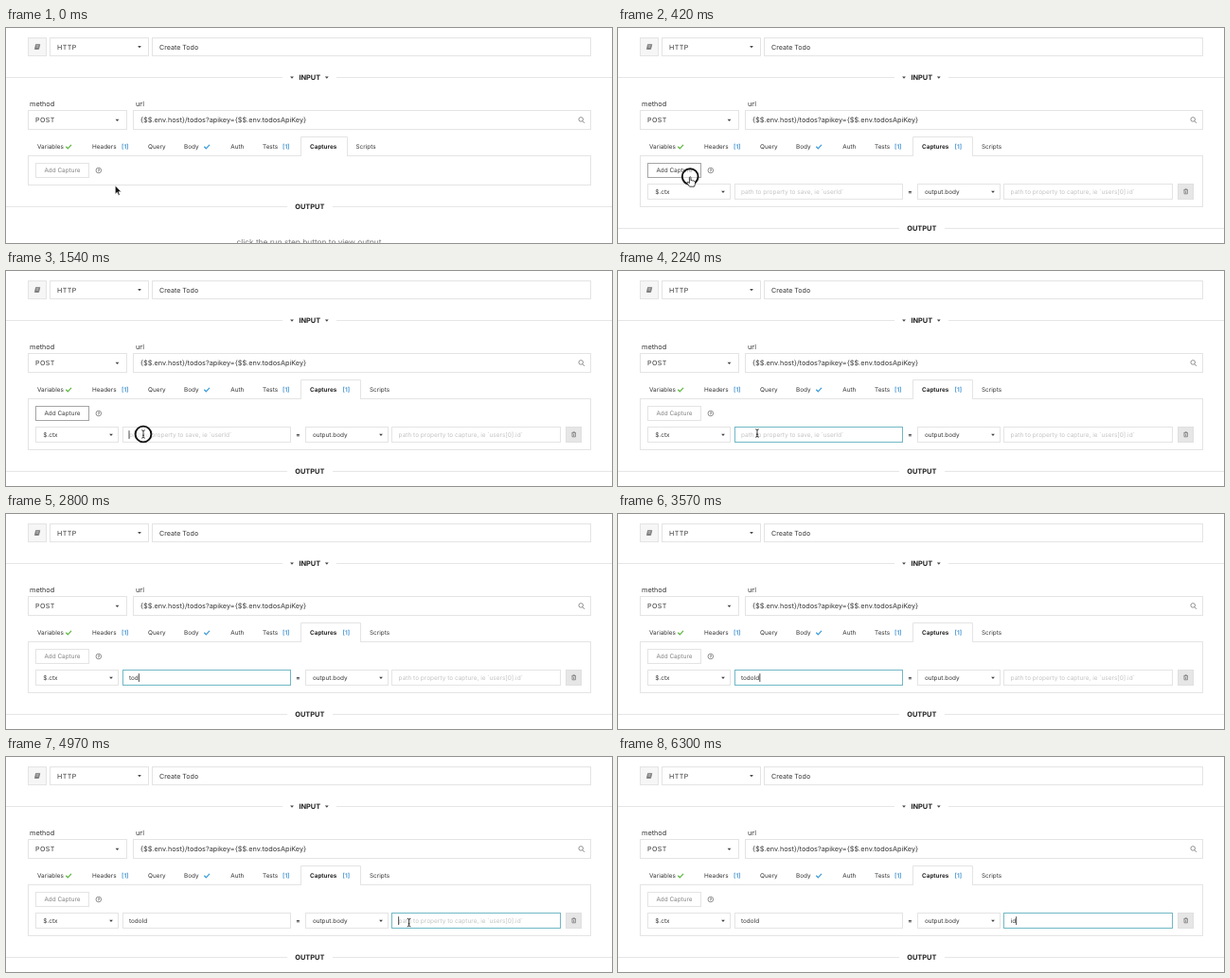
These frames come from a looping animation (640x228 px, 6370 ms). An HTML page:

```html
<!DOCTYPE html>
<html lang="en">
<head>
<meta charset="utf-8">
<title>Add a capture</title>
<style>
  html, body { margin: 0; width: 100%; height: 100%; overflow: hidden; background: #fff; }
  svg { display: block; width: 100vw; height: 100vh; }
  text { font: 6.4px Inter, Roboto, sans-serif; fill: #333; text-rendering: geometricPrecision; white-space: pre; }
  .big { font-size: 7.3px; }
  .caps { font-size: 7.1px; letter-spacing: .4px; }
  .head { font-size: 7.4px; font-weight: 700; fill: #222; text-anchor: middle; }
  .note { font-size: 8.3px; fill: #777; }
  .bold { font-weight: 600; fill: #111; }
  .blue { font-weight: 600; fill: #3a8fd0; }
  .hint { font-size: 6.5px; fill: #c4c4c4; }
  .box { fill: #fff; stroke: #e4e4e4; }
  .grey { fill: #f6f6f6; stroke: #e4e4e4; }
  .rule { fill: none; stroke: #e6e6e6; }
  .tri { fill: #444; }
  .tick { fill: none; stroke-width: 1.25; }
  .icon { fill: none; stroke: #777; }
  .pen { stroke: #111; stroke-width: .8; }
</style>
</head>
<body>
<svg viewBox="0 0 640 228">
  <defs>
    <path id="tri" class="tri" d="M-1.9-.9H1.9L0 1.2Z"/>
  </defs>

  <!-- step header -->
  <rect class="grey" x="23.5" y="10.5" width="19" height="19"/>
  <path d="M31.5 17.4H35.8L34.6 22.4H30.4Z" fill="#777" stroke="#777" stroke-width=".7" stroke-linejoin="round"/>
  <path d="M32 18.8H34.6M31.7 20.2H34.3" stroke="#eee" stroke-width=".6"/>
  <rect class="box" x="46.5" y="10.5" width="104" height="19"/>
  <text class="caps" x="54" y="22.6">HTTP</text>
  <use href="#tri" x="141" y="20"/>
  <rect class="box" x="154.5" y="10.5" width="463" height="19"/>
  <text x="162" y="22.6" style="font-size:7.1px">Create Todo</text>

  <path class="rule" d="M0 52.5H292M349 52.5H640"/>
  <use href="#tri" x="302" y="52.5"/>
  <text class="head" x="320.8" y="55.4">INPUT</text>
  <use href="#tri" x="338.8" y="52.5"/>

  <!-- request -->
  <text class="big" x="25" y="83.2">method</text>
  <text class="big" x="137" y="83.2">url</text>
  <rect class="box" x="23.5" y="87.5" width="104" height="20"/>
  <text class="caps" x="31" y="100.2">POST</text>
  <use href="#tri" x="117.5" y="97.7"/>
  <rect class="box" x="134.5" y="87.5" width="483" height="20"/>
  <text class="big" x="142" y="100">{$$.env.host}/todos?apikey={$$.env.todosApiKey}</text>
  <circle class="icon" cx="607.2" cy="96.9" r="2.3" stroke-width=".8"/>
  <path class="icon" d="M608.9 98.6L611 100.8" stroke-width=".9"/>

  <!-- tabs -->
  <rect id="panel" class="box" x="23.5" y="135.5" width="594"/>
  <path id="tab" class="box"/>
  <text x="33" y="128.3">Variables</text>
  <path class="tick" stroke="#5cb83c" d="M63.3 125.8L65.3 127.8L69 123.8"/>
  <text x="91" y="128.3">Headers</text>
  <text class="blue" x="122" y="128.3">[1]</text>
  <text x="150" y="128.3">Query</text>
  <text x="188" y="128.3">Body</text>
  <path class="tick" stroke="#3a9bdc" d="M209.3 125.8L211.3 127.8L215 123.8"/>
  <text x="237.3" y="128.3">Auth</text>
  <text x="271" y="128.3">Tests</text>
  <text class="blue" x="292" y="128.3">[1]</text>
  <text class="bold" x="321" y="128.3">Captures</text>
  <text id="count" class="blue" x="355.6" y="128.3">[1]</text>
  <text id="scripts" y="128.3">Scripts</text>

  <rect id="btn" class="box" x="31.5" y="143.5" width="56" height="15"/>
  <text id="btnText" x="40.4" y="153.4">Add Capture</text>
  <circle class="icon" cx="97.8" cy="151" r="2.8" stroke-width=".8"/>
  <text x="97.8" y="152.8" text-anchor="middle" style="font-size:4.8px;font-weight:700;fill:#666">?</text>

  <!-- capture row -->
  <g id="row">
    <rect class="box" x="31.5" y="165.5" width="87" height="16"/>
    <text x="39.3" y="175.9">$.ctx</text>
    <use href="#tri" x="111" y="173.7"/>
    <rect id="key" class="box" x="123.5" y="165.5" width="177" height="16"/>
    <text id="keyText" x="130" y="175.9"></text>
    <text class="bold" x="306.2" y="175.9">=</text>
    <rect class="box" x="316.5" y="165.5" width="87" height="16"/>
    <text x="323.9" y="175.9">output.body</text>
    <use href="#tri" x="396" y="173.7"/>
    <rect id="path" class="box" x="407.5" y="165.5" width="178" height="16"/>
    <text id="pathText" x="414.6" y="175.9"></text>
    <rect x="591.5" y="165.5" width="16" height="16" fill="#e6e6e6" stroke="#e0e0e0"/>
    <path class="icon" stroke-width=".8" d="M597.4 171.7H602M598.9 171.5V170.8H600.5V171.5M598 171.9V175.8H601.4V171.9M599.7 173V175"/>
    <path id="caret" stroke="#222" stroke-width=".8" d="M0 169.2V178"/>
  </g>

  <!-- output -->
  <g id="tail">
    <path class="rule" d="M0 189.5H297M345 189.5H640"/>
    <text class="head" x="320.8" y="192.2">OUTPUT</text>
    <text class="note" x="243.5" y="230.3">click the run step button to view output</text>
  </g>

  <circle id="ring" r="8.4" fill="#fff" fill-opacity=".55" stroke="#111" stroke-width="1.9"/>
  <g id="mouse">
    <path id="arrow" d="M0 0V9.2L2.1 7.2L3.5 10.5L5 9.8L3.6 6.7H6.5Z" fill="#111" stroke="#fff" stroke-width=".6"/>
    <path id="hand" class="pen" fill="#fff" stroke-linejoin="round"
      d="M-.8 .8Q0-.6 .8 .8V4.2Q1.6 3.4 2.3 4.3Q3.1 3.7 3.8 4.7Q4.9 4.3 5.3 5.6V7.8L4.3 10.6H-.6L-3.2 7Q-3.6 5.6-2.2 5.8L-.8 7Z"/>
    <path id="beam" class="pen" fill="none" d="M-1.8-4.2Q0-4.2 0-3Q0-4.2 1.8-4.2M0-3.2V3.2M-1.8 4.2Q0 4.2 0 3Q0 4.2 1.8 4.2M-1 1.2H1"/>
  </g>
</svg>

<script>
const LOOP = 6370, TICK = 70;
const $ = id => document.getElementById(id);
const set = (id, attrs) => { for (const k in attrs) $(id).setAttribute(k, attrs[k]); };
const show = (id, on) => set(id, { visibility: on ? 'inherit' : 'hidden' });
const clamp = v => Math.max(0, Math.min(1, v));
const smooth = p => p * p * (3 - 2 * p);
const cubic = p => p < .5 ? 4 * p ** 3 : 1 - 4 * (1 - p) ** 3;
const mix = (a, b, p) => `rgb(${a.map((v, i) => Math.round(v + (b[i] - v) * p))})`;

const LINE = [228, 228, 228], TEAL = [112, 184, 198], DARK = [165, 165, 165];
const SOFT = [130, 130, 130], INK = [60, 60, 60];

// start, end, target x, target y, easing
const moves = [
  [0, 350, 76.2, 157.6, smooth],
  [800, 1400, 145, 173, cubic],
  [1750, 1960, 147, 172, smooth],
  [4060, 4760, 425.6, 175.6, smooth],
];
const clicks = [350, 1540, 4830];
const fields = [
  { id: 'key', x: 130, word: 'todoId', keys: [2450, 2660, 2800, 2940, 3150, 3570],
    hint: 'path to property to save, ie `userId`', on: 1540, off: 4830 },
  { id: 'path', x: 414.6, word: 'id', keys: [5950, 6300],
    hint: 'path to property to capture, ie `users[0].id`', on: 4830, off: LOOP },
];

function mouseAt(t) {
  let x = 115.3, y = 167;
  for (const [from, to, tx, ty, ease] of moves) {
    const p = ease(clamp((t - from) / (to - from)));
    x += (tx - x) * p;
    y += (ty - y) * p;
  }
  return [x, y];
}

function shapeAt(x, y, added) {
  const over = (l, r, top, bottom) => x > l && x < r && y > top && y < bottom;
  if (over(31, 88, 143, 159)) return 'hand';
  if (!added) return 'arrow';
  if (over(31, 119, 165, 182) || over(316, 404, 165, 182)) return 'hand';
  if (over(123, 301, 165, 182) || over(407, 586, 165, 182)) return 'beam';
  return 'arrow';
}

function drawField(f, t) {
  const typed = f.keys.filter(k => k <= t);
  const value = f.word.slice(0, typed.length);
  const label = $(f.id + 'Text');
  label.textContent = value || f.hint;
  label.setAttribute('class', value ? '' : 'hint');
  const glow = clamp((t - f.on) / 140) - clamp((t - f.off) / 140);
  set(f.id, { style: `stroke:${mix(LINE, TEAL, glow)}` });
  if (t < f.on || t >= f.off) return;
  const since = t - Math.max(f.on, ...typed);
  const x = f.x + (value ? label.getComputedTextLength() + .6 : 0);
  set('caret', { transform: `translate(${x} 0)` });
  show('caret', since % 1120 < 560);
}

function draw(t) {
  const added = t >= 420;
  const [x, y] = mouseAt(t);
  const right = added ? 374.5 : 360.5;

  set('panel', { height: added ? 54 : 31 });
  set('tab', { d: `M311.5 136V115.5H${right}V136` });
  set('scripts', { x: added ? 384 : 369.5 });
  set('tail', { transform: `translate(0 ${added ? 23 : 0})` });
  show('count', added);
  show('row', added);

  const lit = clamp((t - 140) / 140) - clamp((t - 1540) / 140);
  set('btn', { style: `stroke:${mix(LINE, DARK, lit)}` });
  set('btnText', { style: `fill:${mix(SOFT, INK, lit)}` });

  show('caret', false);
  fields.forEach(f => drawField(f, t));

  const hidden = (t >= 2450 && t < 4130) || t >= 5950;
  const shape = shapeAt(x, y, added);
  set('mouse', { transform: `translate(${x} ${y})` });
  for (const s of ['arrow', 'hand', 'beam']) show(s, !hidden && s === shape);
  set('ring', { cx: x, cy: y });
  show('ring', clicks.some(c => t >= c && t < c + 140));
}

const start = performance.now();
function frame(now) {
  const t = Math.max(0, now - start) % LOOP;
  draw(Math.floor(t / TICK) * TICK);
  requestAnimationFrame(frame);
}
draw(0);
requestAnimationFrame(frame);
</script>
</body>
</html>
```
